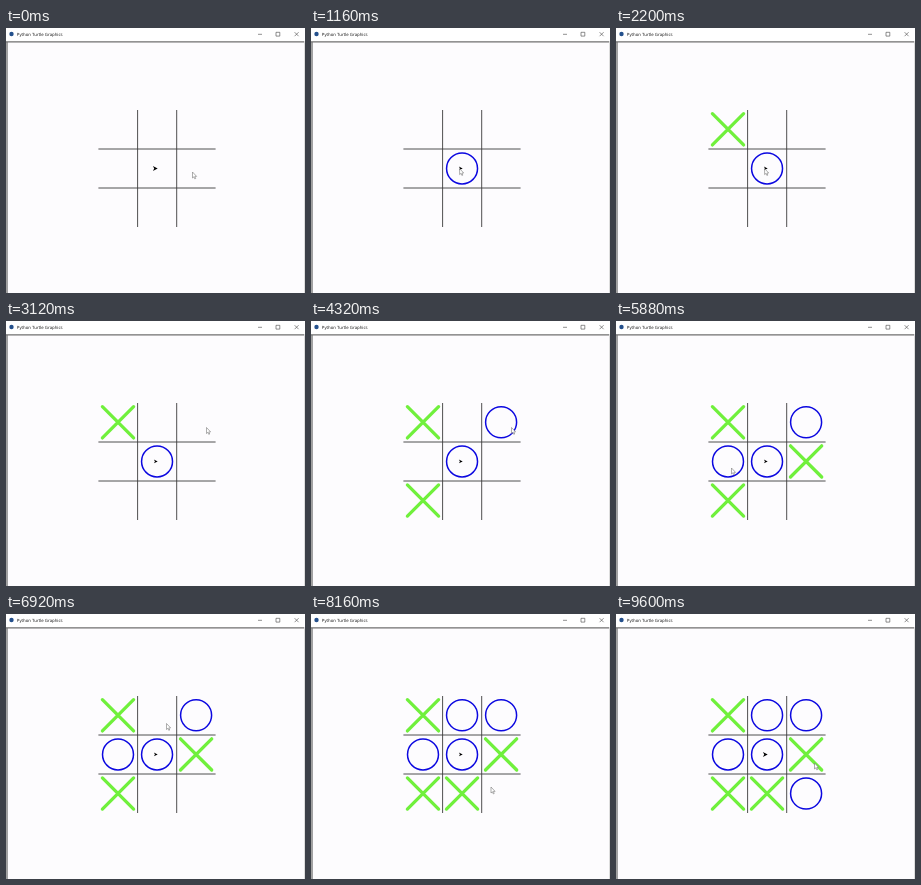
An HTML page that plays this animation: 299x265 px, repeating every 9640 ms.

```html
<!DOCTYPE html>
<html lang="en">
<head>
<meta charset="utf-8">
<title>Python Turtle Graphics</title>
<style>
  html, body { margin: 0; width: 100%; height: 100%; overflow: hidden; background: #fff; }
  svg { display: block; width: 299px; height: 265px; }
  text { font: 4.32px "Open Sans", sans-serif; fill: #111; text-rendering: geometricPrecision; }
  .line { fill: none; stroke: #3c3c3c; stroke-width: .9; }
  .icon { fill: none; stroke: #444; stroke-width: .6; }
  .o, .x { fill: none; stroke-linecap: round; }
  .o { stroke: #0c08e0; stroke-width: 1.5; }
  .x { stroke: #70f03c; stroke-width: 3.3; }
</style>
</head>
<body>
<svg viewBox="0 0 299 265">
  <rect width="299" height="265" fill="#fff"/>
  <rect x="1" y="14" width="297" height="251" fill="#fdfcfe"/>
  <path d="M0 13.9H298M1 13.5V265" fill="none" stroke="#707070" stroke-width="1.3"/>
  <path d="M298.5 13V265" fill="none" stroke="#ddd"/>
  <circle cx="5.5" cy="6" r="2.2" fill="#24508c"/>
  <text x="10.8" y="7.8">Python Turtle Graphics</text>
  <path class="icon" d="M252 6.3h4M270 4.3h3.8v3.8h-3.8zM288.6 4.2l4 4M292.6 4.2l-4 4"/>
  <path class="line" d="M131.6 82V199M170.7 82V199M92.4 121H209.6M92.4 160H209.6"/>
  <g id="board"></g>
  <path id="turtle" d="M0 0L-5.6 -2.9L-4 0L-5.6 2.9Z"/>
  <path id="cursor" d="M0 0V6L1.4 4.8L2.3 6.9L3.2 6.5L2.3 4.4H4.1Z" fill="#fff" stroke="#777" stroke-width=".6"/>
</svg>
<script>
const LOOP = 9640, STEP = 40, R = 15.5, D = 15.6;
const HOME = [151.7, 140.4];

// kind, column, row, start of drawing, time the turtle is home again
const moves = [
  ['o', 1, 1, 680, 1160], ['x', 0, 0, 1520, 1680],
  ['o', 2, 0, 3400, 3520], ['x', 0, 2, 3600, 3760],
  ['o', 0, 1, 5560, 5680], ['x', 2, 1, 5720, 5880],
  ['o', 1, 0, 7200, 7320], ['x', 1, 2, 7320, 7480],
  ['o', 2, 2, 8480, 8640]
];

// time, x, y of the pointer tip
const track = [
  [0, 186.5, 144], [280, 148.6, 140.6], [2280, 148.6, 140.6],
  [2720, 190, 162], [3120, 200.5, 106.5], [4760, 200.5, 106.5],
  [5360, 115.5, 147], [6360, 115.5, 147], [6760, 169, 124],
  [6920, 160.5, 109.5], [7760, 160.5, 109.5], [8160, 180, 173],
  [8240, 181, 174], [9480, 181, 174], [9600, 198.5, 149], [LOOP, 198.5, 149]
];

const byId = id => document.getElementById(id);
const clamp = v => Math.max(0, Math.min(1, v));
const place = (el, x, y, rest = '') =>
  el.setAttribute('transform', `translate(${x} ${y}) ${rest}`);

const turtle = byId('turtle'), cursor = byId('cursor');
const marks = moves.map(([kind, col, row, start, end]) => {
  const el = document.createElementNS('http://www.w3.org/2000/svg', 'path');
  el.setAttribute('class', kind);
  byId('board').append(el);
  return { el, kind, start, end, x: 112 + 39.05 * col, y: 101.3 + 39.1 * row };
});

// Each pen returns the stroke so far, plus the turtle's position and heading.
const pens = {
  o(x, y, p) {
    const a = p * 2 * Math.PI;
    const px = x + R * Math.sin(a), py = y + R * Math.cos(a);
    const top = p > .5 ? `A${R} ${R} 0 0 0 ${x} ${y - R}` : '';
    const d = `M${x} ${y + R}${top}A${R} ${R} 0 0 0 ${px} ${py}`;
    return { d, px, py, turn: -p * 360 };
  },
  x(x, y, p) {
    const second = p > .5, side = second ? -1 : 1;
    const k = D * (2 * (second ? 2 * p - 1 : 2 * p) - 1);
    const px = x + side * k, py = y + k;
    const first = second ? `M${x - D} ${y - D}L${x + D} ${y + D}` : '';
    const d = `${first}M${x - side * D} ${y - D}L${px} ${py}`;
    return { d, px, py, turn: second ? 135 : 45 };
  }
};

function pointer(t) {
  const i = track.findIndex(k => k[0] > t);
  const [t0, x0, y0] = track[i - 1], [t1, x1, y1] = track[i];
  const u = (t - t0) / (t1 - t0), e = u * u * (3 - 2 * u);
  return [x0 + (x1 - x0) * e, y0 + (y1 - y0) * e];
}

function draw(t) {
  const size = t < 680 || t >= 8640 ? .86 : .68;
  place(turtle, ...HOME, `scale(${size})`);
  turtle.setAttribute('fill', '#000');
  for (const { el, kind, start, end, x, y } of marks) {
    if (t < start) {
      el.setAttribute('d', '');
      continue;
    }
    const p = clamp((t - start + STEP) / (kind === 'o' ? 120 : 160));
    const pen = pens[kind](x, y, p);
    el.setAttribute('d', pen.d);
    if (t < end) {
      place(turtle, pen.px, pen.py, `rotate(${pen.turn}) scale(.7)`);
      turtle.setAttribute('fill', kind === 'o' ? '#0c08e0' : '#70f03c');
    }
  }
  place(cursor, ...pointer(t));
}

const begin = performance.now();
function tick() {
  const t = (performance.now() - begin) % LOOP;
  draw(Math.floor(t / STEP) * STEP);
  requestAnimationFrame(tick);
}
tick();
</script>
</body>
</html>
```
